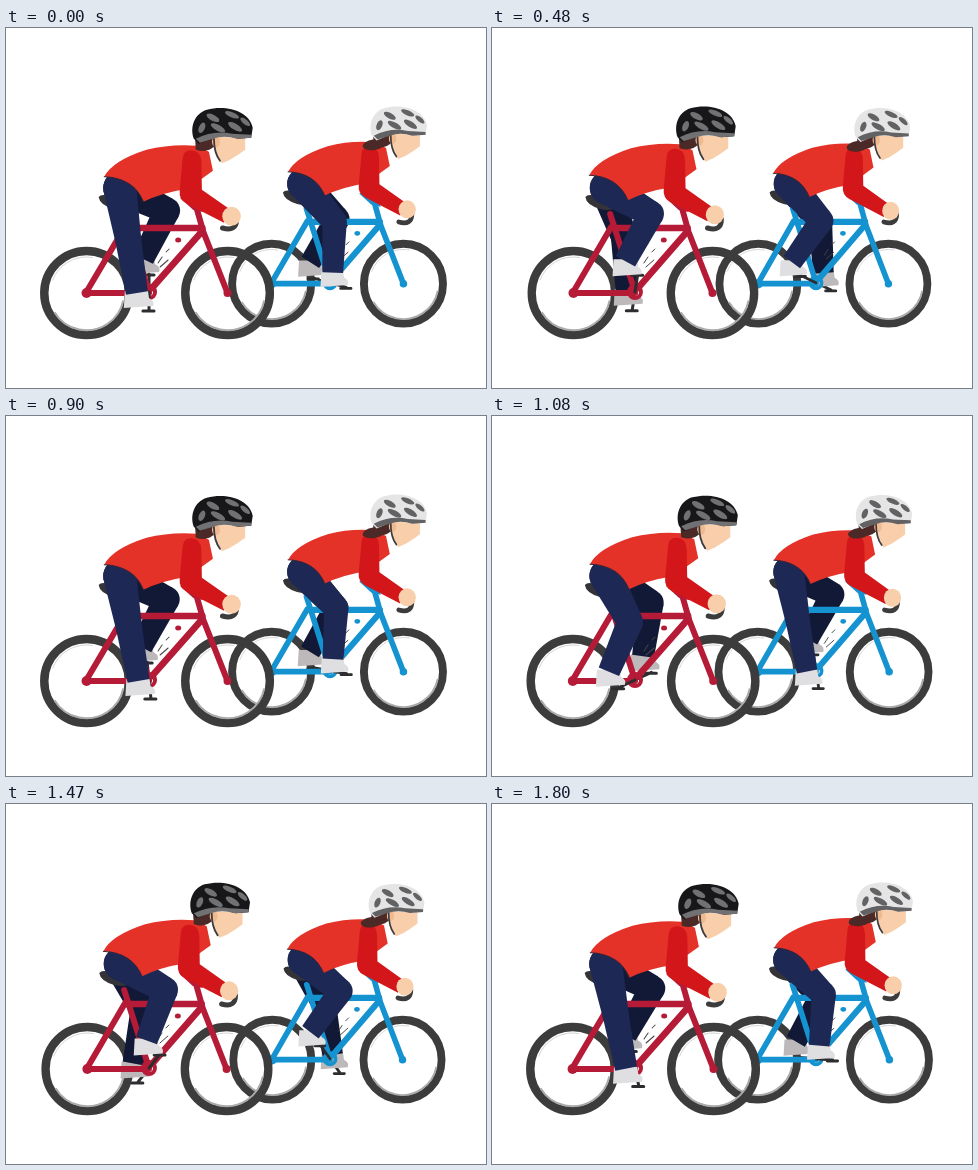
Write an HTML page with a canvas that moves like this. It is 480 by 360 pixels and loops after 1830 ms.

```html
<!DOCTYPE html>
<html>
<head>
<meta charset="utf-8">
<style>
html, body { margin: 0; width: 100%; height: 100%; overflow: hidden; background: #fff; }
canvas { display: block; }
</style>
</head>
<body>
<canvas id="stage" width="480" height="360"></canvas>
<script>
const ctx = document.getElementById('stage').getContext('2d');
const LOOP = 1830, STEP = 30, TAU = Math.PI * 2;
const BB = [143, 264], HIP = [114, 160], THIGH = 52, SHIN = 54;
const SKIN = '#f8cfaa', DARK = '#3c3c3c', HAIR = '#4a2926';

function fill(d, color) {
  ctx.fillStyle = color;
  ctx.fill(new Path2D(d));
}

function line(d, color, width, cap = 'round') {
  ctx.strokeStyle = color;
  ctx.lineWidth = width;
  ctx.lineCap = cap;
  ctx.lineJoin = 'round';
  ctx.stroke(new Path2D(d));
}

function oval(x, y, rx, ry, color, turn = 0) {
  ctx.fillStyle = color;
  ctx.beginPath();
  ctx.ellipse(x, y, rx, ry, turn, 0, TAU);
  ctx.fill();
}

function arc(x, y, r, from, to, color, width) {
  ctx.strokeStyle = color;
  ctx.lineWidth = width;
  ctx.beginPath();
  ctx.arc(x, y, r, from, to);
  ctx.stroke();
}

// Tapered bar between two points
function limb([x1, y1], r1, [x2, y2], r2, color) {
  const a = Math.atan2(y2 - y1, x2 - x1) + Math.PI / 2;
  const c = Math.cos(a), s = Math.sin(a);
  fill(`M${x1 + c * r1},${y1 + s * r1}L${x2 + c * r2},${y2 + s * r2}
    L${x2 - c * r2},${y2 - s * r2}L${x1 - c * r1},${y1 - s * r1}Z`, color);
}

function wheel(x) {
  arc(x, 265, 42, 0, TAU, DARK, 8.4);
  arc(x, 265, 37.2, 0.2, 2.6, '#aaa', 2);
  arc(x, 265, 36, 3.5, 4.9, '#d5d5d5', 1);
}

function kneeOf([x, y]) {
  const dx = x - HIP[0], dy = y - HIP[1], d = Math.hypot(dx, dy);
  const along = (THIGH ** 2 - SHIN ** 2 + d * d) / (2 * d);
  const out = Math.sqrt(Math.max(0, THIGH ** 2 - along ** 2));
  return [HIP[0] + (dx * along + dy * out) / d, HIP[1] + (dy * along - dx * out) / d];
}

function crank(a) {
  const x = BB[0] + 18 * Math.cos(a), y = BB[1] + 18 * Math.sin(a);
  line(`M${BB}L${x},${y}M${x - 6},${y + 1}h11`, '#2d2d30', 3);
}

function leg(a, footX, footY, pants, shoe) {
  const x = footX + 15.5 * Math.cos(a), y = footY + 16 * Math.sin(a);
  const ankle = [x - 1, y - 7], knee = kneeOf(ankle);
  fill(`M${x - 13},${y - 9}H${x + 10}L${x + 11},${y - 2}Q${x + 17},${y + 1} ${x + 15},${y + 6}
    L${x - 14},${y + 8}Z`, shoe);
  oval(...HIP, 16.5, 16.5, pants);
  limb(HIP, 16.5, knee, 13, pants);
  oval(...knee, 13, 13, pants);
  limb(knee, 13, ankle, 11, pants);
}

function frame(color) {
  line('M81,265H143M82,262L119,199M118,186L143,264', color, 6);
  line('M122,200H196M146,260L196,203', color, 6.5);
  line('M188,172L197,204L221,265', color, 6);
  fill('M174,170L190,163L197,184L187,182Z', color);
  oval(81, 265, 5, 5, color);
  oval(221, 265, 4, 4, color);
  oval(172, 212, 3, 2.5, color);
  arc(...BB, 6, 0, TAU, color, 4);
  line('M152,235l4,-6M154,239l8,-7M160,224l3,-3', '#444', 1);
}

function head(shell, vent, bun) {
  fill('M188,106H209V116Q201,125 189,121Z', HAIR);
  if (bun) oval(189, 119.5, 12, 5.5, HAIR, -.15);
  fill('M207,108L238,109V121L231,126L223,131L215,134.5L209,127Z', SKIN);
  oval(209, 113, 4, 5.5, '#f0ba91');
  line('M207,110Q207,124 213,132', '#3b3b42', 1.8);
  fill(`M187,110C183,99 187,85 200,81C219,76 242,82 245.5,99
    L244,109L231,110Q218,105 206,109L192,115Z`, shell);
  fill('M189,110Q207,101 225,105L244,106V109L230,110Q217,106 206,110L193,114Z', vent);
  [[206, 89, 7, 3, .5], [225, 86, 7.5, 2.6, .4], [195, 99, 3, 5.5, .4],
   [211, 99, 8, 3, .5], [228, 98, 8, 3, .55], [238, 93, 6, 2.4, .7]]
    .forEach(([x, y, rx, ry, turn]) => oval(x, y, rx, ry, vent, turn));
}

function body(shell, vent, bun) {
  fill(`M98,148Q106,132 140,121Q164,115 190,117L202,123L206,142L181,160
    Q155,164 137,173Q127,149 98,148Z`, '#e53229');
  line('M98,148Q127,149 137,173', '#3a2436', 1);
  fill(`M176,129Q177,121 185,121.5Q194,122 194.5,133L195,161L222,180
    L217,194L180,175Q172,171 173,162Z`, '#d31619');
  oval(224.5, 187.5, 9.2, 9.5, SKIN);
  head(shell, vent, bun);
}

function cyclist(angle, sway, bob, o) {
  ctx.save();
  ctx.translate(o.x, o.y);
  ctx.scale(o.sx, o.sy);
  ctx.translate(-sway, 0);
  ctx.scale(1 + sway * .007, 1);
  wheel(81);
  wheel(221);
  crank(angle + Math.PI);
  leg(angle + Math.PI, 138, 254, '#121936', '#bdb9bb');
  frame(o.color);
  fill('M93,169Q96,165 106,169L128,177Q122,184 108,181Q94,177 93,169Z', '#343438');
  line('M216,200Q230,204 230,191', DARK, 5);
  crank(angle);
  leg(angle, 132, 256, '#1d2855', '#dfdfe1');
  ctx.translate(sway * .8 - .3, bob);
  body(o.shell, o.vent, o.bun);
  ctx.restore();
}

const riders = [
  { x: 190.3, y: 3.95, sx: .935, sy: .95, start: 16, bob: -.8, color: '#1593d1',
    shell: '#e5e5e6', vent: '#626264', bun: true },
  { x: 0, y: 0, sx: 1, sy: 1, start: 90, bob: .8, color: '#b51a36',
    shell: '#171719', vent: '#717174', bun: false }
];

function draw(now) {
  const t = Math.floor(now % LOOP / STEP) * STEP;
  const turn = t / LOOP * 2 * TAU;
  const sway = Math.cos(turn);
  ctx.fillStyle = '#fff';
  ctx.fillRect(0, 0, 480, 360);
  for (const r of riders) cyclist(r.start * TAU / 360 + turn, sway, r.bob * sway, r);
  requestAnimationFrame(draw);
}
requestAnimationFrame(draw);
</script>
</body>
</html>
```
